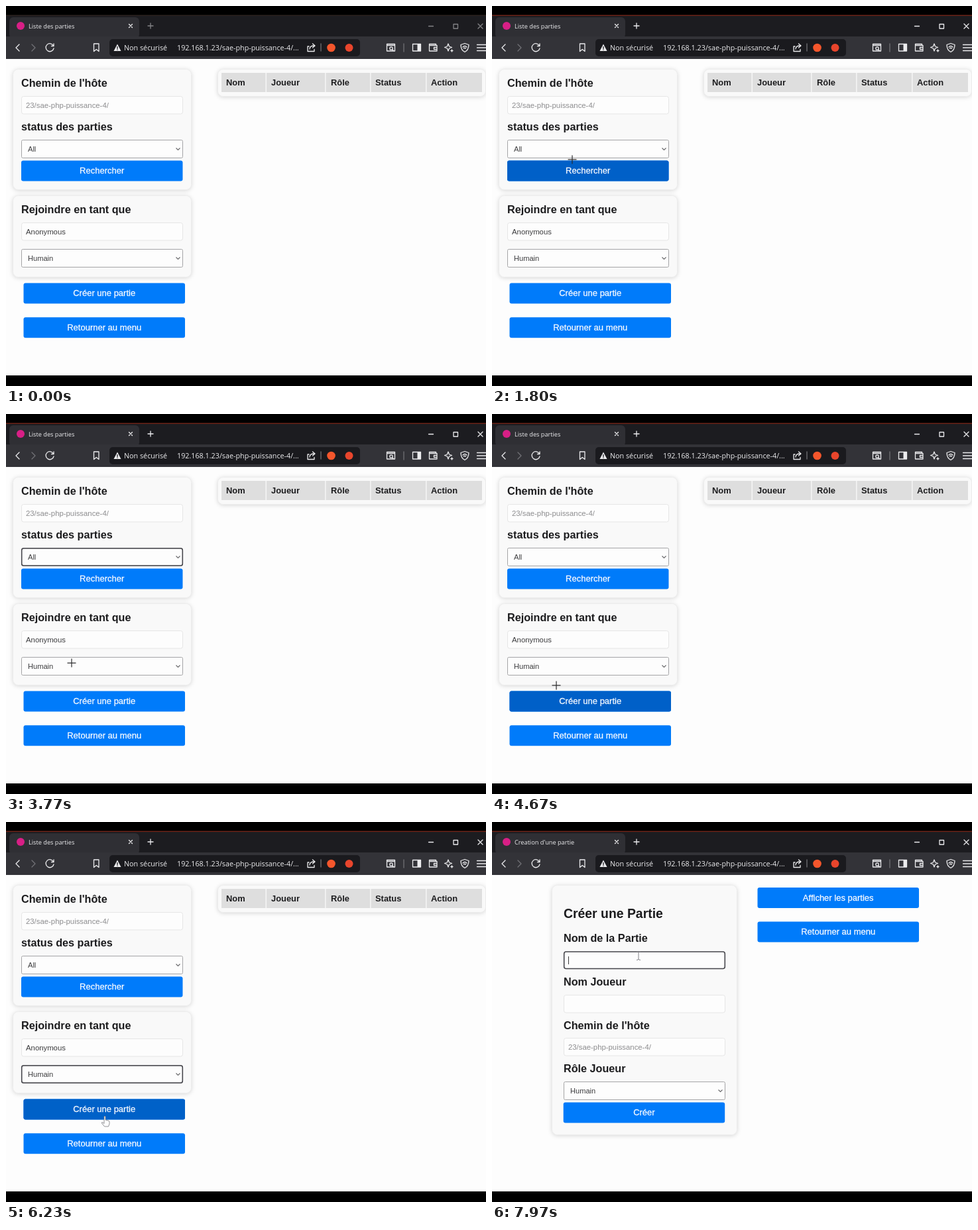
An HTML page for the animation above (8000 ms loop, 724 px wide and 574 px high).

```html
<!DOCTYPE html>
<html lang="fr">
<head>
<meta charset="utf-8">
<title>Liste des parties</title>
<style>
  html, body { margin: 0; width: 100%; height: 100%; overflow: hidden; background: #000; }
  svg { display: block; width: 724px; height: 574px; }
  text { font-family: "Liberation Sans", Arial, sans-serif; fill: #3c3c3e; white-space: pre; }
  .ui { font-family: "Open Sans", "Noto Sans", sans-serif; fill: #ececee; }
  .h { font-weight: bold; fill: #1c1c1e; }
  .label { fill: #f4f8ff; stroke: #f4f8ff; stroke-width: .3; text-anchor: middle; }
  .card { fill: #f9f9f9; stroke: #ececec; filter: drop-shadow(0 1px 3px #00000026); }
  .line { fill: none; stroke: #ececee; stroke-width: 1.3; stroke-linecap: round; stroke-linejoin: round; }
  .dim { stroke: #717176; }
</style>
</head>
<body>
<svg id="stage" viewBox="0 0 724 574"></svg>
<script>
const LOOP = 8000;
const stage = document.getElementById('stage');

const rect = (x, y, w, h, fill, r = 0, extra = '') =>
  `<rect x="${x}" y="${y}" width="${w}" height="${h}" rx="${r}" fill="${fill}" ${extra}/>`;
const text = (x, y, size, str, cls = '', extra = '') =>
  `<text x="${x}" y="${y}" font-size="${size}" class="${cls}" ${extra}>${str}</text>`;
const line = (d, cls = '', extra = '') => `<path d="${d}" class="line ${cls}" ${extra}/>`;
const dot = (x, y, r, fill) => `<circle cx="${x}" cy="${y}" r="${r}" fill="${fill}"/>`;
const group = (id, body, extra = '') => `<g id="${id}" ${extra}>${body}</g>`;

const card = (x, y, w, h) => `<rect x="${x}" y="${y}" width="${w}" height="${h}" rx="8" class="card"/>`;
const heading = (x, y, str, size = 16.2) => text(x, y, size, str, 'h');
const field = (x, y, str = '', color = '#3c3c3e') =>
  rect(x + .5, y, 243, 26.5, '#fdfdfd', 3, 'stroke="#e6e6e6"') +
  text(x + 7, y + 17.5, 11.35, str, '', `style="fill:${color}"`);
const select = (x, y, str) =>
  rect(x + .5, y, 243, 27, '#fdfdfd', 2, 'stroke="#a4a4a6"') +
  text(x + 10, y + 17, 11.1, str) +
  `<path d="M${x + 233.5} ${y + 12}l3 3 3-3" fill="none" stroke="#666668" stroke-width="1.1"/>`;
const focusRing = (id, x, y, h) =>
  rect(x + .7, y, 242.6, h, 'none', 3, `id="${id}" stroke="#48484e" stroke-width="1.6"`);
const button = (x, y, str, hoverId) =>
  rect(x, y, 243.5, 31, '#007bfa', 3) +
  (hoverId ? rect(x, y, 243.5, 31, '#0061c8', 3, `id="${hoverId}"`) : '') +
  text(x + 121.7, y + 19.5, 13, str, 'label');

const PATH = '23/sae-php-puissance-4/', GREY = '#8c8c8e';

const browser = () =>
  rect(0, 14, 724, 66, '#1c1c20') +
  rect(0, 13.5, 724, 1.5, '#6e2418', 0, 'id="accent"') +
  rect(5, 17, 196, 32, '#2f2f34', 6) +
  rect(0, 46, 724, 34, '#333338') +
  rect(156, 50, 378, 26, '#1a1a1e', 5) +
  group('favicon', dot(22, 30, 6, '#d81f86')) +
  group('globe', dot(22, 30, 5.5, '#a6a6aa') + line('M17 29l4 1 2 4M21 25l1 3 4 1', '', 'style="stroke:#38383c"')) +
  `<svg x="34" y="18" width="138" height="26"><text id="tabTitle" x="0" y="16" font-size="9.2" class="ui"></text></svg>` +
  line('M185.5 27.5l5 5m0-5l-5 5') +
  group('controls', line('M214 30h8m-4-4v8M637.5 30.5h7M675 27.5h6.5v6.5h-6.5zM712 27l7 7m0-7l-7 7')) +
  line('M20 58l-5 5 5 5') + line('M39 58l5 5-5 5', 'dim') +
  group('reload', line('M71.5 60a6 6 0 1 0 .5 4M72 57v3.5h-3.5', '', 'stroke-width="1.6"')) +
  group('stop', line('M62.5 59l8 8m0-8l-8 8')) +
  line('M132.5 57h7.5v11.5l-3.7-3-3.8 3z') +
  '<path d="M168 57.5l5.5 10.5h-11z" fill="#ececee"/>' +
  line('M168 61.5v3m0 1.7v.1', '', 'style="stroke:#1a1a1e"') +
  text(178, 66.7, 10.75, 'Non sécurisé', 'ui', 'font-weight="500"') +
  text(258, 66.7, 10.75, '192.168.1.23/sae-php-puissance-4/...', 'ui') +
  line('M457 61h-2v7.5h10v-3M458 65c0-4 3-5 7-5m-2.5-3l3.5 3-3.5 3') +
  line('M475 57v11', 'dim') +
  dot(490.5, 63, 6.3, '#f4562c') + dot(517.5, 63, 6, '#e8452c') +
  line('M574.5 57.5h12v10.5h-12zM574.5 59.5h12M583 66l2 2') +
  '<circle cx="581" cy="64" r="2.2" class="line"/>' +
  line('M600 57v12', 'dim') +
  line('M613.5 57.5h12v10.5h-12z') + rect(620.5, 57.5, 5, 10.5, '#ececee') +
  line('M638.5 57.5h10v2h1.5v8.5h-11.5zM638.5 59.5h10M645.5 62.5h4.5v3h-4.5z') +
  line('M667 57l1.5 4 4 1.5-4 1.5-1.5 4-1.5-4-4-1.5 4-1.5zM672.5 66v3m-1.5-1.5h3') +
  line('M692 56.5l6 2c0 6-2 9-6 11-4-2-6-5-6-11zM689 62c2-2 4-2 6 0m-4.5 2c1-1 2-1 3 0') +
  line('M710.5 58.5h14M710.5 63h14M710.5 67.5h14');

const listPage = () =>
  card(10.5, 95.5, 269, 182) +
  heading(23, 122, "Chemin de l'hôte") + field(23, 136.5, PATH, GREY) +
  heading(23, 187.5, 'status des parties') + select(23, 202.5, 'All') +
  focusRing('focusStatus', 23, 203, 26) +
  button(23, 233.5, 'Rechercher', 'hoverSearch') +
  card(10.5, 286.5, 269, 123) +
  heading(23, 312.5, 'Rejoindre en tant que') + field(23, 327.5, 'Anonymous') +
  select(23, 367.5, 'Humain') + focusRing('focusRole', 23, 368, 26) +
  button(26.5, 418.5, 'Créer une partie', 'hoverCreate') +
  button(26.5, 470.3, 'Retourner au menu') +
  card(319.5, 95.5, 404, 41) + rect(325, 101, 393, 29, '#dedede') +
  [391.5, 481, 549, 633].map(x => rect(x, 101, 1.5, 29, '#f5f5f5')).join('') +
  [[332, 'Nom'], [400, 'Joueur'], [490, 'Rôle'], [557, 'Status'], [641, 'Action']]
    .map(([x, str]) => text(x, 120, 12.9, str, 'h')).join('');

const createPage = () =>
  card(90.5, 95.5, 279, 377) +
  heading(108, 145, 'Créer une Partie', 19.4) +
  heading(108, 181, 'Nom de la Partie') + field(108, 195.5) +
  group('focusName', focusRing('nameRing', 108, 196, 25.5) + rect(115, 203, 1, 12, '#3c3c3e')) +
  heading(108, 246.5, 'Nom Joueur') + field(108, 261.5) +
  heading(108, 312.5, "Chemin de l'hôte") + field(108, 326.5, PATH, GREY) +
  heading(108, 378, 'Rôle Joueur') + select(108, 392.5, 'Humain') +
  button(107.7, 423.5, 'Créer') +
  button(400.5, 99, 'Afficher les parties') + button(400.5, 150.5, 'Retourner au menu');

// Pointer shapes, each with its hot spot at 0,0
const pointers = {
  arrow: '<path d="M0 0v13l3-3 2 5 2-1-2-4.500h4z" fill="#fff" stroke="#222"/>',
  cross: '<path d="M-6.500 0h13M0-6.500v13" stroke="#2c2c2e" stroke-width="1.2"/>',
  hand: '<path d="M-1 1q1-2 2 0v5l4 1q2 .5 2 2v3l-1.500 4h-6l-4-5q-.5-2 1.500-1l2 1.500z" fill="#fdfdfd" stroke="#77777a" stroke-width=".8"/>',
  beam: '<path d="M-3-6.500q3 0 3 1.500v10q0 1.500-3 1.500M3-6.500q-3 0-3 1.500m0 10q0 1.500 3 1.500" fill="none" stroke="#808086"/>'
};

stage.innerHTML =
  rect(0, 80, 724, 478, '#fdfdfd') + browser() +
  group('listPage', listPage()) + group('createPage', createPage()) +
  group('pointer', Object.entries(pointers).map(([id, shape]) => group(id, shape)).join(''));

// Pointer route: time, x, y, shape used from then on
const route = [
  [500, 690, 40, 'arrow'], [870, 688, 44, 'arrow'], [1330, 180, 266, 'cross'],
  [1480, 140, 254, 'hand'], [1700, 123, 240, 'cross'], [1800, 121, 232, 'cross'],
  [2050, 119, 216, 'cross'], [2850, 117, 218, 'cross'], [2960, 115, 235, 'hand'],
  [3130, 109, 266, 'cross'], [3330, 104, 322, 'cross'], [3770, 99, 376, 'cross'],
  [4150, 98, 386, 'cross'], [4300, 98, 420, 'hand'], [4450, 98, 440, 'hand'],
  [4600, 97, 419, 'cross'], [4670, 97, 410, 'cross'], [4950, 102, 382, 'cross'],
  [5500, 104, 382, 'cross'], [5800, 126, 420, 'hand'], [6230, 149, 444, 'hand'],
  [6450, 151, 440, 'hand'], [6950, 151, 440, 'hand'], [7150, 160, 410, 'cross'],
  [7650, 221, 202, 'beam'], [LOOP, 221, 202, 'beam']
];

const el = id => document.getElementById(id);
const show = (id, on) => { el(id).style.display = on ? '' : 'none'; };
const clamp = v => Math.max(0, Math.min(1, v));
const within = (t, from, to) => t >= from && t < to;
const fade = (t, from, to) => clamp((t - from) / 200) * clamp((to + 200 - t) / 200);

function movePointer(t) {
  show('pointer', t >= route[0][0]);
  const next = Math.max(1, route.findIndex(key => key[0] > t));
  const [t0, x0, y0, shape] = route[next - 1];
  const [t1, x1, y1] = route[next];
  const k = clamp((t - t0) / (t1 - t0));
  el('pointer').setAttribute('transform', `translate(${x0 + (x1 - x0) * k} ${y0 + (y1 - y0) * k})`);
  for (const id in pointers) show(id, id === shape);
}

function render(t) {
  const active = t >= 500, created = t >= 6850, loading = within(t, 6800, 7400);
  const fresh = created && loading;

  el('accent').setAttribute('fill', active ? '#6e2418' : '#2c2220');
  el('controls').style.opacity = active ? 1 : .5;
  el('tabTitle').textContent = fresh ? '192.168.1.23/sae-php-puissance-4/'
    : created ? "Creation d'une partie" : 'Liste des parties';
  show('favicon', !fresh);
  show('globe', fresh);
  show('reload', !loading);
  show('stop', loading);

  show('listPage', !created);
  show('createPage', created);
  show('focusStatus', within(t, 2150, 4100));
  show('focusRole', t >= 5200);
  show('focusName', t >= 7750);
  el('hoverSearch').style.opacity = Math.max(fade(t, 1480, 1800), fade(t, 2960, 3130));
  el('hoverCreate').style.opacity = Math.max(fade(t, 4300, 4670), fade(t, 5800, LOOP));

  movePointer(t);
}

const start = performance.now();
function tick() {
  render((performance.now() - start) % LOOP);
  requestAnimationFrame(tick);
}
tick();
</script>
</body>
</html>
```
